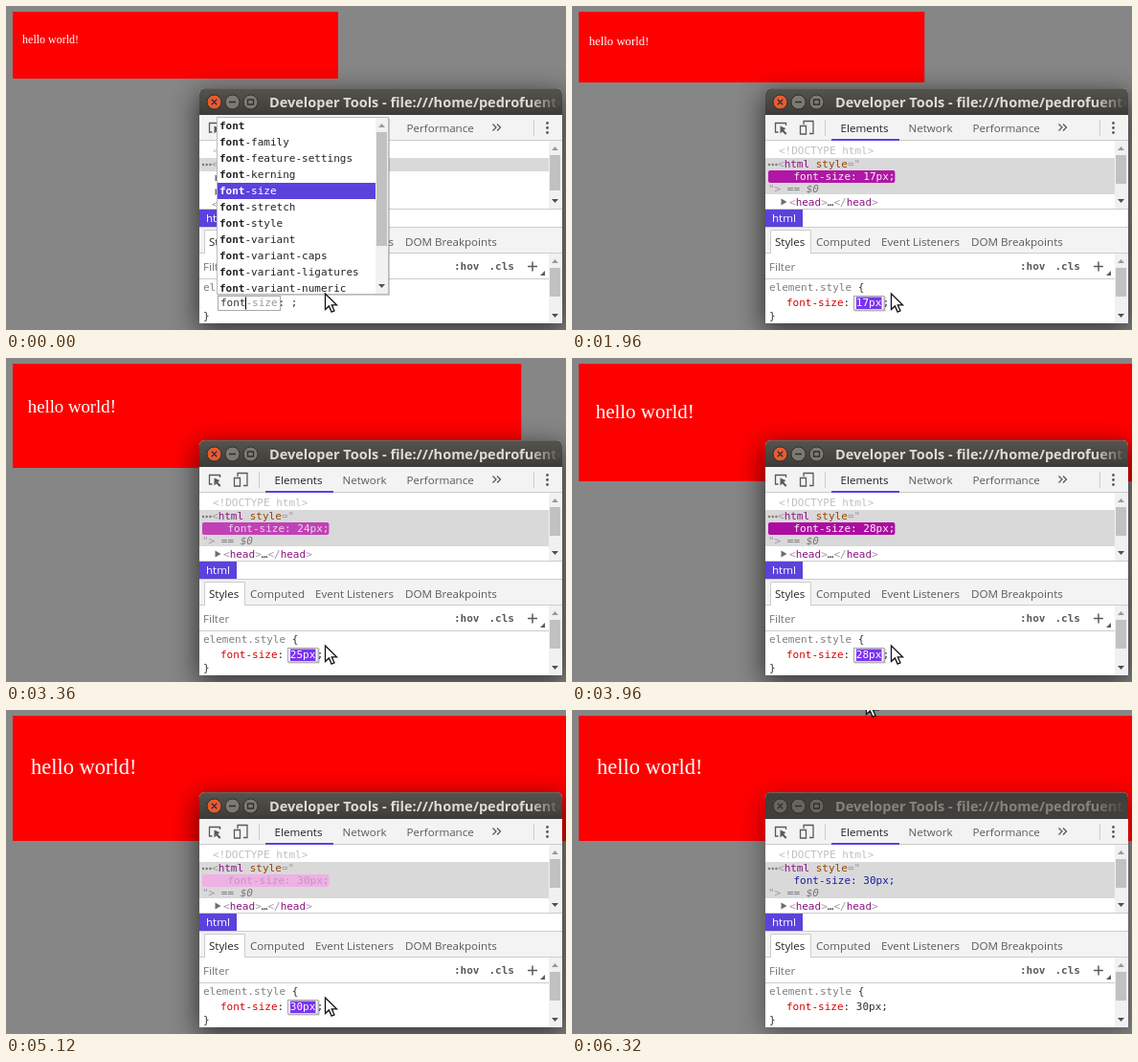
These frames come from a looping animation (585 px wide and 339 px high, 6400 ms). An HTML page:

```html
<!DOCTYPE html>
<html lang="en">
<head>
<meta charset="utf-8">
<title>Font size stepping</title>
<style>
html, body { margin: 0; width: 100%; height: 100%; overflow: hidden; background: #868686; }
svg { display: block; }
text { white-space: pre; }
.mono { font: 11px "DejaVu Sans Mono", monospace; }
.ui { font: 11.6px "Open Sans", "Noto Sans", sans-serif; fill: #5a5a5a; }
.page { font-family: "Liberation Serif", serif; fill: #fff; }
.title { font: 700 14.5px "Open Sans", "Noto Sans", sans-serif; }
.b { font-weight: 700; }
.tag { fill: #881280; }
.punct { fill: #a894a6; }
.attr { fill: #994500; }
.dim { fill: #777; font-style: italic; }
.prop { fill: #d80000; }
.ink { fill: #303030; }
</style>
</head>
<body>
<svg id="stage" width="585" height="339" viewBox="0 0 585 339">
  <defs>
    <linearGradient id="bar" x2="0" y2="1"><stop stop-color="#55544e"/><stop offset="1" stop-color="#3c3b37"/></linearGradient>
    <linearGradient id="fadeOn" gradientUnits="userSpaceOnUse" x1="545" x2="580" y1="0" y2="0"><stop stop-color="#dfdbd2"/><stop offset="1" stop-color="#dfdbd2" stop-opacity="0"/></linearGradient>
    <linearGradient id="fadeOff" gradientUnits="userSpaceOnUse" x1="545" x2="580" y1="0" y2="0"><stop stop-color="#85837c"/><stop offset="1" stop-color="#85837c" stop-opacity="0"/></linearGradient>
    <filter id="blur" x="-30%" y="-40%" width="160%" height="180%"><feGaussianBlur stdDeviation="14"/></filter>
  </defs>
  <rect width="585" height="339" fill="#868686"/>

  <rect id="box" x="7" y="6" fill="#f00"/>
  <text id="hello" class="page">hello world!</text>

  <!-- window frame -->
  <rect id="shadow" x="200" y="92" width="383" height="248" filter="url(#blur)"/>
  <path d="M202 332V92q0-6 6-6h367q6 0 6 6v240z" fill="#fff"/>
  <path id="titlebar" d="M202 114V92q0-6 6-6h367q6 0 6 6v22z" fill="url(#bar)"/>
  <path d="M208 86.5h367" stroke="#67665f"/>
  <g id="buttons" stroke="#2f2e2a">
    <circle id="close" cx="217.5" cy="100.5" r="7.5"/>
    <circle cx="236.5" cy="100.5" r="7.5"/>
    <circle cx="255.5" cy="100.5" r="7.5"/>
    <path d="M214.8 97.8l5.4 5.4m0-5.4l-5.4 5.4M233 100.5h7M252.5 98h6v5h-6z" fill="none" stroke-width="1.3"/>
  </g>
  <text id="title" class="title" x="275" y="105.5">Developer Tools - file:///home/pedrofuente</text>

  <!-- main toolbar -->
  <path d="M202 114h379v27H202z" fill="#f3f3f3"/>
  <path d="M202 140.5h379" stroke="#ccc"/>
  <path d="M271 139h71v2h-71z" fill="#5b42dd"/>
  <path d="M264.5 119v17M551.5 119v17" stroke="#ccc"/>
  <g fill="none" stroke="#5a5a5a" stroke-width="1.3">
    <path d="M223.500 125v-2.500h-11v9.500h3"/>
    <path d="M217.500 125.500v8l2.200-2 3.300 3.300 1.500-1.500-3.300-3.300 2-2z" fill="#5a5a5a" stroke="none"/>
    <path d="M242 124v-3.500h10v13h-4M238.500 125.500h6v8.500h-6z"/>
    <path d="M508.500 123.500l3.500 3.500-3.500 3.500m4.500-7l3.500 3.500-3.500 3.500M528.500 241.500l3.500 3.500-3.500 3.500m4.500-7l3.500 3.500-3.500 3.500"/>
  </g>
  <g fill="#5a5a5a"><circle cx="565.500" cy="122.500" r="1.400"/><circle cx="565.500" cy="127.500" r="1.400"/><circle cx="565.500" cy="132.500" r="1.400"/></g>
  <g class="ui">
    <text x="280.500" y="131.500" style="fill:#222">Elements</text>
    <text x="351.500" y="131.500">Network</text>
    <text x="418.500" y="131.500">Performance</text>
  </g>

  <!-- element tree -->
  <g class="mono">
    <rect id="selected" x="202" y="159" width="365" fill="#d9d9d9"/>
    <text x="216" y="154.500" fill="#c0c0c0">&lt;!DOCTYPE html&gt;</text>
    <g fill="#777"><circle cx="206" cy="166" r="1.200"/><circle cx="209.700" cy="166" r="1.200"/><circle cx="213.400" cy="166" r="1.200"/></g>
    <g id="plainTree">
      <text x="215" y="169" class="punct">&lt;<tspan class="tag">html</tspan>&gt;<tspan class="dim"> == $0</tspan></text>
      <path d="M218.500 176.500v7l6-3.500zM218.500 191v7l6-3.500z" fill="#6e6e6e"/>
      <text x="227" y="184" class="punct">&lt;<tspan class="tag">head</tspan>&gt;<tspan class="ink">…</tspan>&lt;/<tspan class="tag">head</tspan>&gt;</text>
      <text x="227" y="198" class="punct">&lt;<tspan class="tag">body</tspan>&gt;<tspan class="ink">…</tspan>&lt;/<tspan class="tag">body</tspan>&gt;</text>
      <text x="215" y="211" class="punct">&lt;/<tspan class="tag">html</tspan>&gt;</text>
    </g>
    <g id="styledTree">
      <text x="215" y="169" class="punct">&lt;<tspan class="tag">html</tspan> <tspan class="attr">style</tspan>="</text>
      <rect id="flash" x="205" y="172" height="13" rx="2"/>
      <text id="rule" x="231.500" y="182"></text>
      <text x="205" y="195" class="punct">"&gt;<tspan class="dim"> == $0</tspan></text>
      <path d="M218.500 201.500v7l6-3.500z" fill="#6e6e6e"/>
      <text x="227" y="209" class="punct">&lt;<tspan class="tag">head</tspan>&gt;<tspan class="ink">…</tspan>&lt;/<tspan class="tag">head</tspan>&gt;</text>
    </g>
  </g>

  <!-- breadcrumb, side tabs, filter -->
  <path d="M202 212h379v20H202z" fill="#fff"/>
  <path d="M202 212.500h379M202 231.500h379" stroke="#ccc"/>
  <path d="M202 213h39v18h-39z" fill="#5b42dd"/>
  <path d="M202 232h379v27H202z" fill="#f3f3f3"/>
  <path d="M202 258.500h379M202 285.500h365" stroke="#ccc"/>
  <path d="M207.500 259v-24.500h42V259" fill="#fff" stroke="#ccc"/>
  <g class="ui">
    <text x="209" y="226" style="fill:#fff">html</text>
    <text x="212" y="250.500" style="fill:#222">Styles</text>
    <text x="255" y="250.500">Computed</text>
    <text x="323" y="250.500">Event Listeners</text>
    <text x="417" y="250.500">DOM Breakpoints</text>
    <text x="206" y="276.500" style="fill:#757575">Filter</text>
  </g>
  <g class="mono b" fill="#5a5a5a"><text x="468" y="276">:hov</text><text x="504.500" y="276">.cls</text></g>
  <path d="M545 272.500h10m-5-5v10" stroke="#5a5a5a" stroke-width="1.500"/>
  <path d="M563 277v5h-5z" fill="#5a5a5a"/>
  <g id="bars"></g>

  <!-- style rule -->
  <g class="mono">
    <text x="206" y="298" fill="#808080">element.style <tspan class="ink">{</tspan></text>
    <text x="206" y="328" class="ink">}</text>
    <g id="nameEdit">
      <rect x="221.500" y="303.500" width="65" height="15" fill="#fff" stroke="#aaa"/>
      <text x="224" y="314" class="ink">font<tspan fill="#999">-size</tspan></text>
      <path d="M250.500 304.500v13" stroke="#000"/>
      <text x="284.500" y="314" class="ink">: ;</text>
    </g>
    <g id="valueEdit">
      <text x="224" y="314" class="prop">font-size<tspan class="ink">:</tspan></text>
      <rect id="fieldShade" x="295" y="304" height="15.500" fill="#000" opacity=".25"/>
      <rect id="field" x="294.500" y="303.500" height="14.500" fill="#fff" stroke="#aaa"/>
      <rect id="mark" x="297" y="304.500" height="12.500" fill="#7b33f0"/>
      <text id="value" x="296.800" y="314"></text>
      <path id="caret" stroke="#000"/>
      <text id="semi" y="314" class="ink">;</text>
    </g>
    <g id="namePopup"></g>
    <g id="valuePopup"></g>
  </g>

  <path id="cursor" d="M0 0v16.500l3.900-3.600 2.700 6.200 2.900-1.300-2.700-6h5.200z" fill="#fff" stroke="#111" stroke-width="1.300"/>
</svg>
<script>
const $ = id => document.getElementById(id);
const LOOP = 6400, CHAR = 6.62, DOM_LAG = 60, FLASH = 1400;

// [time, value typed or stepped]
const edits = [[560, "1"], [800, "16"], [1080, "16p"], [1220, "16px"]];
[1860, 2050, 2240, 2420, 2590, 2750, 2960, 3150, 3330, 3520, 3700, 3880, 4070, 4260]
  .forEach((at, i) => edits.push([at, 17 + i + "px"]));

const set = (id, attrs) => {
  for (const k in attrs) $(id).setAttribute(k, attrs[k]);
};
const show = (id, on) => { $(id).style.display = on ? "" : "none"; };
const latest = t => edits.filter(e => e[0] <= t).pop();
const mix = (a, b, k) => `rgb(${a.map((v, i) => Math.round(v + (b[i] - v) * k))})`;

function scrollbar(x, top, bottom, thumbTop, thumbEnd, id) {
  const c = x + 6.5;
  return `<path d="M${x} ${top}h13V${bottom}h-13z" fill="#f1f1f1"/>
    <path d="M${c - 3.5} ${top + 10}h7l-3.5-4z" fill="#9a9a9a"/>
    <path d="M${c - 3.5} ${bottom - 10}h7l-3.5 4z" fill="#505050"/>
    <rect ${id ? `id="${id}"` : ""} x="${x + 1}" y="${thumbTop}" width="11" height="${thumbEnd - thumbTop}" fill="#c1c1c1"/>`;
}

function popup(x, w, items, prefix, chosen) {
  let s = `<rect x="${x + 1}" y="118" width="${w}" height="185" fill="#000" opacity=".2"/>
    <rect x="${x + .5}" y="116.500" width="${w - 1}" height="185" fill="#fff" stroke="#bbb"/>`;
  items.forEach((item, i) => {
    const on = i === chosen, y = 117 + i * 17;
    if (on) s += `<rect x="${x + 1}" y="${y + 68 - 68}" width="${w - 15}" height="17" fill="#5b42dd"/>`;
    s += `<text x="${x + 3}" y="${y + 12}" fill="${on ? "#fff" : "#222"}"><tspan class="b">${prefix}</tspan>${item}</text>`;
  });
  return s + scrollbar(x + w - 14, 117, 301, 132, 251);
}

$("bars").innerHTML = scrollbar(567, 141, 212, 156, 186, "treeThumb") + scrollbar(567, 259, 332, 274, 304);
$("namePopup").innerHTML = popup(220, 180,
  ["", "-family", "-feature-settings", "-kerning", "-size", "-stretch", "-style", "-variant",
   "-variant-caps", "-variant-ligatures", "-variant-numeric"], "font", 4);
$("valuePopup").innerHTML = popup(293, 143,
  ["inherit", "initial", "large", "larger", "medium", "small", "smaller", "unset",
   "x-large", "x-small", "xx-large"], "", -1);

// cubic-bezier(0, 0, .2, 1)
function easeOut(x) {
  let lo = 0, hi = 1;
  for (let i = 0; i < 20; i++) {
    const s = (lo + hi) / 2;
    if (.6 * s * s + .4 * s ** 3 < x) lo = s; else hi = s;
  }
  return lo * lo * (3 - 2 * lo);
}

function drawPage(value) {
  const size = Math.max(16, parseInt(value) || 16);
  set("box", { width: 21.25 * size, height: Math.round(4.375 * size) });
  set("hello", { x: 7 + .63 * size, y: 6 + 2.045 * size, "font-size": .75 * size });
}

function drawTree(t) {
  const edit = latest(t - DOM_LAG);
  show("plainTree", !edit);
  show("styledTree", edit);
  set("selected", { height: edit ? 38 : 14 });
  set("treeThumb", { height: edit ? 30 : 37 });
  if (!edit) return;
  const rule = `font-size: ${edit[1]};`;
  const age = (t - DOM_LAG - edit[0]) / FLASH;
  const lit = age < 1, k = easeOut(Math.min(1, age));
  $("rule").textContent = rule;
  set("rule", { fill: lit ? mix([255, 255, 255], [178, 140, 178], k) : "#1a1aa6" });
  set("flash", { width: (rule.length + 4) * CHAR, fill: mix([168, 0, 156], [249, 198, 240], k) });
  show("flash", lit);
}

function drawField(t, value) {
  const editing = t < 5400, stepped = t >= edits[4][0];
  const w = value.length * CHAR, end = 296.8 + w;
  show("nameEdit", t < 120);
  show("namePopup", t < 120);
  show("valueEdit", t >= 120);
  show("valuePopup", t >= 120 && t < edits[0][0]);
  show("field", editing);
  show("fieldShade", editing);
  show("mark", editing && stepped);
  show("caret", editing && !stepped);
  set("field", { width: w + 5 });
  set("fieldShade", { width: w + 6 });
  set("mark", { width: w });
  set("caret", { d: `M${Math.round(end) - .5} 304.500v12.500` });
  set("value", { fill: editing && stepped ? "#fff" : "#303030" });
  set("semi", { x: end + (editing ? 1.5 : 0) });
  $("value").textContent = value;
}

function drawCursor(t) {
  const k = Math.min(1, Math.max(0, (t - 5440) / 520));
  const e = k * k * (3 - 2 * k);
  const exit = Math.min(1, Math.max(0, (t - 5960) / 80));
  set("cursor", { transform: `translate(${333.5 - 26 * e} ${301 - 304 * e - 9 * exit})` });
}

function drawFrame(active) {
  set("shadow", { opacity: active ? .62 : .38 });
  set("titlebar", { fill: active ? "url(#bar)" : "#403f3b" });
  set("title", { fill: active ? "url(#fadeOn)" : "url(#fadeOff)" });
  set("buttons", { fill: active ? "#7b7a73" : "#66655f" });
  set("close", { fill: active ? "#ea5b30" : "#66655f" });
}

function draw(now) {
  const t = now % LOOP, edit = latest(t), value = edit ? edit[1] : "";
  drawPage(value);
  drawTree(t);
  drawField(t, value);
  drawCursor(t);
  drawFrame(t < 6240);
  requestAnimationFrame(draw);
}
const start = performance.now();
(function tick() { draw(0); })();
</script>
</body>
</html>
```
